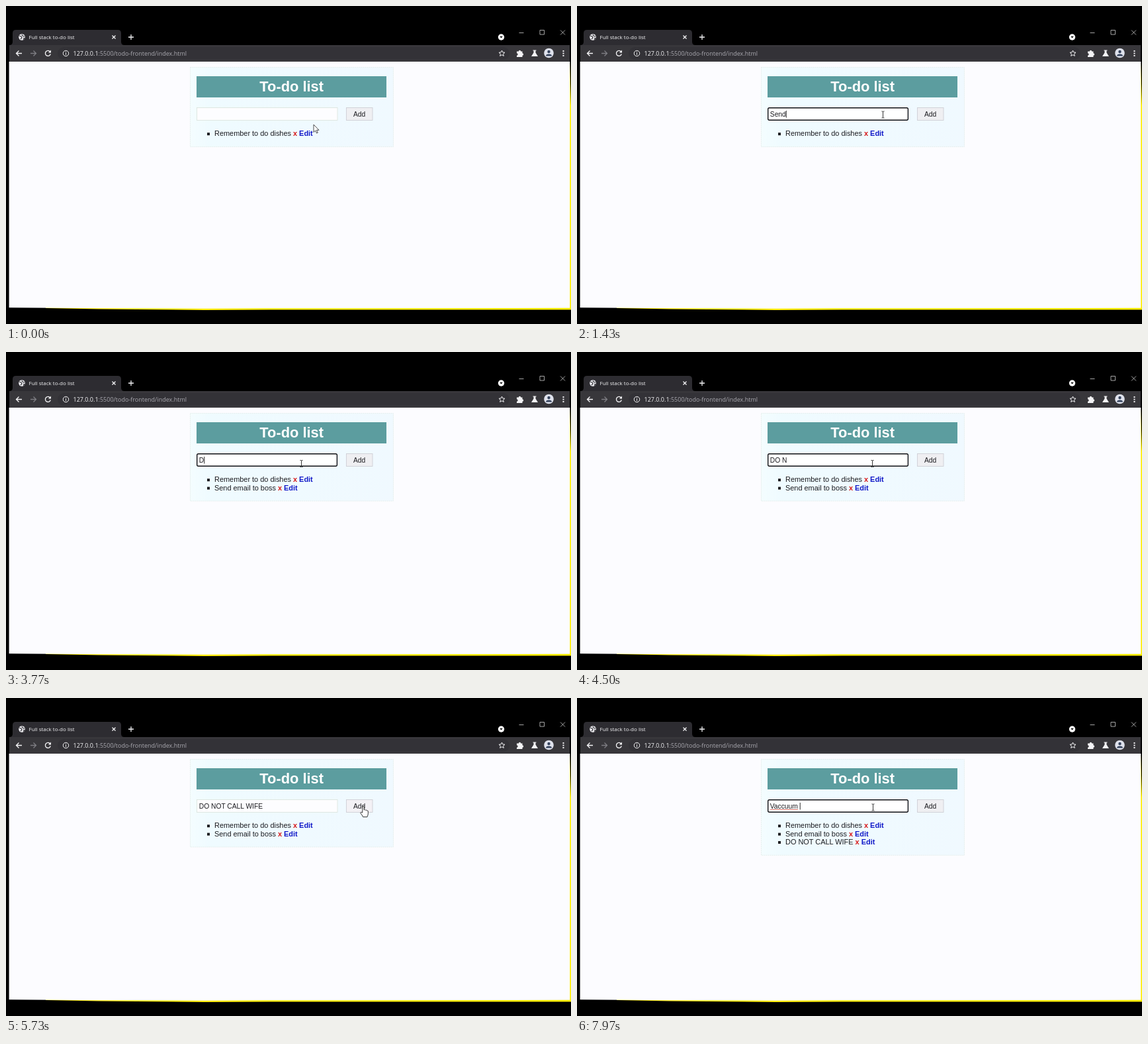
An HTML page that plays this animation: 854 px wide and 480 px high, repeating every 8 s.

```html
<!DOCTYPE html>
<html lang="en">
<head>
<meta charset="utf-8">
<title>Full stack to-do list</title>
<style>
  html, body { margin: 0; width: 100%; height: 100%; overflow: hidden; background: #000; }
  svg { display: block; width: 854px; height: 480px; }
  text { white-space: pre; }
  .chrome { font-family: "Open Sans", "Noto Sans", sans-serif; fill: #f4f4f6; }
  .page { font-family: "Liberation Sans", Arial, sans-serif; fill: #1c1c20; }
  .control { font-size: 10.25px; }
  .item { font-size: 10.93px; }
  .bold { font-weight: bold; }
  .line { fill: none; stroke: #f4f4f6; stroke-width: 1.3; }
  .thin { stroke-width: 1; }
  .window { stroke: #d0d0d0; stroke-width: .8; }
  .dim { stroke: #7d7d82; }
</style>
</head>
<body>
<svg viewBox="0 0 854 480">
  <defs>
    <linearGradient id="card-fill">
      <stop offset="0" stop-color="#f4fdff"/>
      <stop offset=".1" stop-color="#effbff"/>
      <stop offset="1" stop-color="#f0f9ff"/>
    </linearGradient>
  </defs>
  <rect width="854" height="480"/>

  <!-- Tab strip -->
  <path d="M5 59Q10 59 10 54V41Q10 36 15 36H169Q174 36 174 41V54Q174 59 179 59Z" fill="#2d2c31"/>
  <circle cx="24" cy="47" r="4.8" fill="#ececf0"/>
  <path d="M20 45l3 1 1 2-2 2M24 43l1 2 3 1M26 48l2 1-2 2" fill="none" stroke="#2d2c31" stroke-width="1.1"/>
  <text class="chrome" x="34.5" y="50" font-size="8">Full stack to-do list</text>
  <path class="line" d="M160.500 44.500l5 5m0-5l-5 5M185 47h8m-4-4v8"/>
  <circle cx="748.500" cy="47" r="4.700" fill="#fff"/>
  <path d="M746.300 45.800h4.400l-2.200 2.800z"/>
  <path class="line window" d="M775.500 40.500h7M807 36.500h6.500v6.500H807zM838 36.500l7 7m0-7l-7 7"/>

  <!-- Toolbar -->
  <rect x="5" y="59" width="847" height="25" fill="#38373b"/>
  <rect x="78" y="62" width="683" height="19" rx="9.500" fill="#333237"/>
  <path class="line" d="M24 71.500h-8.500m4-4l-4 4 4 4"/>
  <path class="line dim" d="M37 71.500h8.500m-4-4l4 4-4 4"/>
  <path class="line" d="M66.700 69a4 4 0 1 0 .6 3.500"/>
  <path d="M68 66.500v4h-4z" fill="#f4f4f6"/>
  <circle class="line thin" cx="90.500" cy="71.500" r="4.200"/>
  <path class="line thin" d="M90.500 70.800v3m0-5v1"/>
  <text class="chrome" x="101.500" y="74.600" font-size="9">127.0.0.1<tspan fill="#aaa9b0">:5500/todo-frontend/index.html</tspan></text>
  <path class="line thin" d="M749.500 67l1.300 2.900 3.200.3-2.400 2.100.7 3.100-2.800-1.600-2.800 1.600.7-3.100-2.400-2.100 3.200-.3z"/>
  <path d="M772 68.500h2.800a1.700 1.700 0 0 1 3.400 0h2.300v2.800a1.700 1.700 0 0 1 0 3.400V77H772v-2.300a1.700 1.700 0 0 0 0-3.400z" fill="#f4f4f6"/>
  <path d="M796.500 66.500h5v1h-1v3l3.500 5.500H794l3.500-5.500v-3h-1z" fill="#f4f4f6"/>
  <circle cx="820.500" cy="71" r="7.300" fill="#dfe2ec"/>
  <circle cx="820.500" cy="69" r="2.200" fill="#34425c"/>
  <path d="M816 75.500q0-3 4.500-3t4.500 3z" fill="#34425c"/>
  <path d="M842.500 67v2m0 1.500v2m0 1.500v2" stroke="#f4f4f6" stroke-width="2"/>

  <!-- Page with its skewed yellow edge -->
  <path d="M852 84L854 150V458.500H400L300 459 140 457.500 60 456V455H852z" fill="#ffee00"/>
  <path d="M4.600 84H852.300V455.800L390 456.300 300 456.700 140 456.300 4.600 455.200z" fill="#fcfcff"/>

  <g class="page">
    <rect id="card" x="278.500" y="92.500" width="307" fill="url(#card-fill)" stroke="#e0ebe8" stroke-width=".8" stroke-dasharray="2 1"/>
    <rect x="288" y="106" width="287" height="32" fill="#5c9d9f"/>
    <text class="bold" x="431.700" y="129.300" font-size="21.870" text-anchor="middle" fill="#fff">To-do list</text>
    <rect id="field"/>
    <text id="typed" class="control" x="291.800" y="166.800"></text>
    <path id="spelling" fill="none" stroke="#d8574a" stroke-width=".8" d="M292 168.500h42"/>
    <path id="caret" stroke="#111" stroke-width=".9"/>
    <rect id="button" x="514.500" y="153.500" width="39.500" height="19" stroke="#cfcfd6" stroke-width=".9"/>
    <text class="control" x="534" y="166.800" text-anchor="middle">Add</text>
    <g id="list"></g>
  </g>

  <g id="pointer">
    <path id="arrow" d="M0 0V11.500L2.700 9 4.500 13 6.300 12.200 4.500 8.300H8z" fill="#fff" stroke="#222" stroke-width=".8"/>
    <path id="beam" d="M-2 -5h1.500l.5.500.5-.5H2M0 -4.500V4.500M-2 5h1.500l.5-.5.5.5H2" fill="none" stroke="#222" stroke-width=".9"/>
    <path id="hand" d="M-1.200 0Q0-1.500 1.200 0V5Q2.800 4 3.500 5.300 5 4.500 5.500 6 7 5.500 7.300 7V11Q7 13 6 15.500H-.5Q-1 13.500-4.300 9.500-4.300 7.300-1.200 9z" fill="#fff" stroke="#222" stroke-width=".9"/>
  </g>
</svg>

<script>
const LOOP = 8000;
const $ = id => document.getElementById(id);
const set = (el, attrs) => { for (const k in attrs) el.setAttribute(k, attrs[k]); };
const show = (el, on) => el.style.display = on ? "" : "none";
const within = (t, spans) => spans.some(([from, to]) => t >= from && t < to);

const focusSpans = [[260, 3120], [3630, 5690], [6300, LOOP]];
const caretOff = [[600, 920], [4480, 4590], [7640, 7960]];
const pressed = [[3120, 3200], [5690, 5790]];

// Each run spreads its keystrokes evenly from start to end.
const runs = [
  { text: "Send", start: 1170, end: 1400 },
  { text: " email to boss", start: 1510, end: 2770 },
  { clear: true, start: 3200 },
  { text: "DO N", start: 3770, end: 4430 },
  { text: "OT CALL WIFE", start: 4600, end: 5330 },
  { clear: true, start: 5790 },
  { text: "Va", start: 6500, end: 6620 },
  { text: "cc", start: 6870, end: 6970 },
  { text: "uum ", start: 7300, end: 7430 }
];

const items = [
  { text: "Remember to do dishes", at: 0 },
  { text: "Send email to boss", at: 3200 },
  { text: "DO NOT CALL WIFE", at: 5790 }
];

const path = [
  [0, 465, 179], [30, 465, 179], [280, 462.5, 164],
  [2890, 462.5, 164], [3100, 540, 164], [3210, 540, 164], [3430, 446.5, 168.5],
  [5520, 446.5, 168.5], [5690, 540, 164], [5800, 540, 164], [6130, 447.5, 165]
];

items.forEach((item, i) => {
  const y = 196.2 + i * 12.4;
  $("list").insertAdjacentHTML("beforeend",
    `<g><rect x="304" y="${y - 5}" width="4" height="4"/><text class="item" x="315" y="${y}">${item.text}` +
    `<tspan class="bold" fill="#d81818"> x</tspan><tspan class="bold" fill="#1018c8"> Edit</tspan></text></g>`);
  item.node = $("list").lastChild;
});

function typedAt(t) {
  let value = "";
  for (const { text, start, end, clear } of runs) {
    if (t < start) break;
    if (clear) { value = ""; continue; }
    const step = (end - start) / (text.length - 1);
    value += text.slice(0, Math.floor((t - start) / step + 1e-6) + 1);
  }
  return value;
}

function pointerAt(t) {
  const next = path.findIndex(p => p[0] > t);
  if (next < 0) return path[path.length - 1].slice(1);
  const [t0, x0, y0] = path[next - 1], [t1, x1, y1] = path[next];
  const u = (t - t0) / (t1 - t0), e = u * u * (3 - 2 * u);
  return [x0 + (x1 - x0) * e, y0 + (y1 - y0) * e];
}

function render(t) {
  const focused = within(t, focusSpans);
  set($("field"), focused
    ? { x: 288.7, y: 153.7, width: 211.7, height: 18.6, rx: 2, fill: "#fff", stroke: "#101014", "stroke-width": 1.4 }
    : { x: 288.5, y: 153.5, width: 212.5, height: 19, rx: 0, fill: "#fdfdff", stroke: "#d9e3da", "stroke-width": .8 });

  $("typed").textContent = typedAt(t);
  const caretX = 292.4 + $("typed").getComputedTextLength();
  set($("caret"), { d: `M${caretX} 158v10.500` });
  show($("caret"), focused && !within(t, caretOff));
  show($("spelling"), t >= 7570);

  for (const item of items) show(item.node, t >= item.at);
  set($("card"), { height: 107.6 + 12.4 * items.filter(i => t >= i.at).length });

  const [x, y] = pointerAt(t);
  const inRow = y > 153 && y < 173;
  const shape = inRow && x < 501 ? "beam" : inRow && x > 514 ? "hand" : "arrow";
  for (const id of ["arrow", "beam", "hand"]) show($(id), id === shape);
  set($("pointer"), { transform: `translate(${x} ${y})` });
  set($("button"), { fill: within(t, pressed) ? "#f3f1f5" : shape === "hand" ? "#e6e6ea" : "#efeff2" });
}

const began = performance.now();
function tick() {
  render((performance.now() - began) % LOOP);
  requestAnimationFrame(tick);
}
tick();
</script>
</body>
</html>
```
